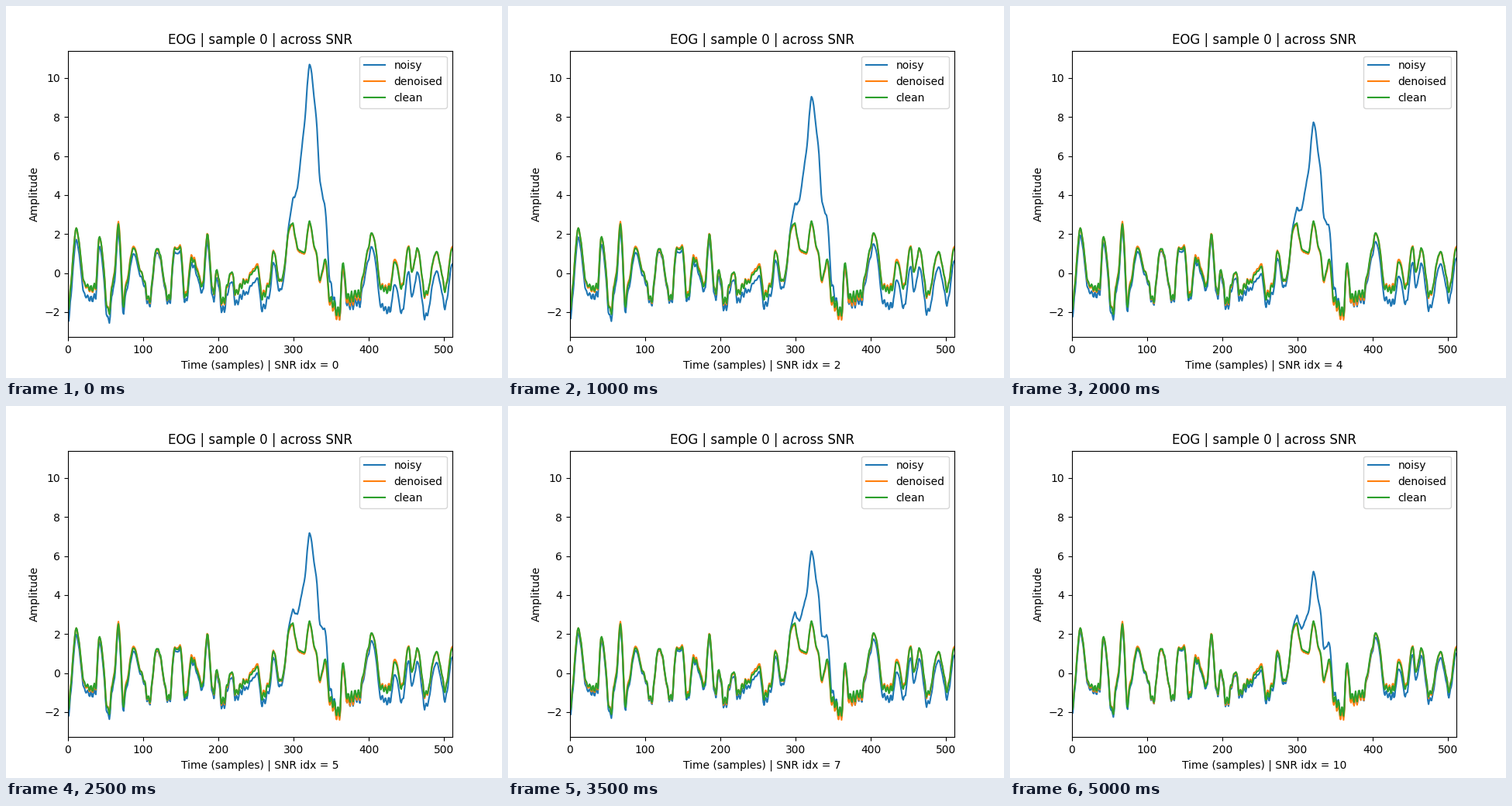
Animation of 640 by 480 pixels, one loop 5500 ms. Source, as a matplotlib script:

```python
import numpy as np
import matplotlib.pyplot as plt
from matplotlib.animation import FuncAnimation

LEVELS = 11
STEP_MS = 500
t = np.arange(512)
rng = np.random.default_rng(4)


def bell(center, width):
    return np.exp(-((t - center) / width) ** 2 / 2)


def wave(period, peak):
    return np.cos(2 * np.pi * (t - peak) / period)


def swing(points):
    """Cosine-eased path through a few turning points."""
    x, y = np.array(points, float).T
    i = np.clip(np.searchsorted(x, t, side="right") - 1, 0, len(x) - 2)
    s = (t - x[i]) / (x[i + 1] - x[i])
    return y[i] + (y[i + 1] - y[i]) * (1 - np.cos(np.pi * s)) / 2


# Main peaks and troughs; the fine texture is added by rule
turns = [
    (0, -1.75), (11, 2.2), (23, -.6), (36, -.8), (42, 1.9), (54, -2),
    (61, -.3), (67, 2.5), (74, -1.7), (78, -.3), (88, 1.4), (97, 0),
    (108, -1.4), (118, 1.3), (134, -1.35), (142, 1.2), (149, 1.3),
    (156, -1.3), (165, .75), (179, -.7), (185, 1.95), (193, -1), (198, .1),
    (205, -1.4), (218, 0), (222, -1), (234, -.5), (252, .2), (258, -1.3),
    (267, -.7), (273, 1.1), (282, -.5), (298, 2.6), (306, 1.2), (314, 1.1),
    (321, 2.6), (329, 1.2), (335, -.3), (342, .65), (348, -1.4), (361, -2),
    (365, .5), (372, -1.2), (385, -1), (405, 2), (417, -.8), (428, -.8),
    (435, .6), (444, -.7), (453, 1.5), (457, .1), (465, 1.2), (475, -1.2),
    (490, 1.1), (502, -.8), (511, 1.25),
]
base = swing(turns)
ripple = .22 * np.clip(-base, 0, 1) * wave(4.5, 26)
grain = .12 * np.convolve(rng.normal(size=t.size), [.25, .5, .25], "same")
clean = base + ripple + grain

# Eye blink on a slow drift, and what the denoiser leaves behind
drift = -.4 - .2 * wave(260, 0) - .9 * bell(445, 38)
artefact = 8.5 * bell(322.5, 13.3) + drift
leftover = .03 + .1 * wave(90, 163) - .3 * bell(352, 20)

fig, ax = plt.subplots(figsize=(6.4, 4.8), dpi=100)
noisy_line, = ax.plot(t, clean + artefact, label="noisy")
ax.plot(t, clean + leftover, label="denoised")
ax.plot(t, clean, label="clean")
ax.set_xlim(0, 511)
ax.set_ylim(-3.28, 11.4)
ax.set_title("EOG | sample 0 | across SNR")
ax.set_ylabel("Amplitude")
ax.legend(loc="upper right")


def update(k):
    # Each level is 1 dB cleaner than the last
    noisy_line.set_ydata(clean + artefact * 10 ** (-k / 20))
    ax.set_xlabel(f"Time (samples) | SNR idx = {k}")
    return noisy_line,


anim = FuncAnimation(fig, update, frames=LEVELS, interval=STEP_MS,
                     repeat=True, repeat_delay=0, blit=False)
plt.show()
```
